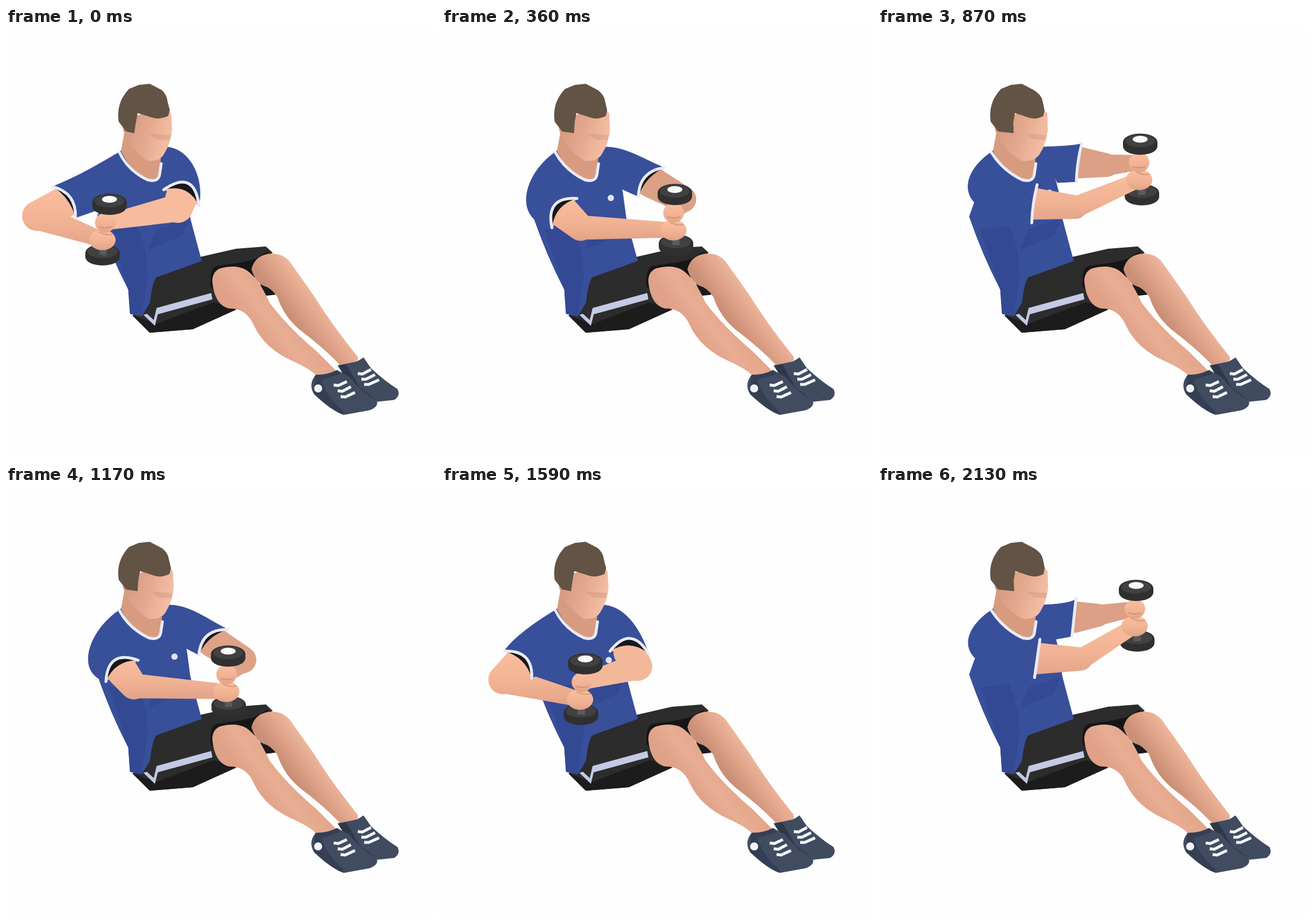
An HTML page for the animation above (2.16 s loop, 748 px wide and 748 px high).

```html
<!DOCTYPE html>
<html lang="en">
<head>
<meta charset="utf-8">
<title>Seated twist with dumbbell</title>
<style>
  html, body { margin: 0; width: 100%; height: 100%; overflow: hidden; background: #fefefe; }
  svg { display: block; width: 100vw; height: 100vh; }
  .shirt { fill: #384f9a; stroke: #384f9a; stroke-width: 1; stroke-linejoin: round; }
  .shade { fill: #263a7c; opacity: .25; }
  .band { fill: #17181c; }
  .trim { fill: none; stroke: #e8ebf6; stroke-width: 5; stroke-linecap: round; stroke-linejoin: round; }
  .skin { fill: url(#skinTone); }
  .lace { fill: none; stroke: #f4f5f8; stroke-width: 5; }
  .crease { fill: none; stroke: #a8694f; stroke-width: 2; opacity: .4; }
</style>
</head>
<body>
<svg viewBox="0 0 748 748">
  <defs>
    <linearGradient id="skinTone" x2="0" y2="1">
      <stop stop-color="#f9bf9f"/><stop offset=".6" stop-color="#f1b294"/><stop offset="1" stop-color="#e2a286"/>
    </linearGradient>
    <linearGradient id="farLegTone" gradientUnits="userSpaceOnUse" x1="502" y1="512" x2="550" y2="476">
      <stop stop-color="#c98f77"/><stop offset=".5" stop-color="#dfa388"/><stop offset="1" stop-color="#efb89d"/>
    </linearGradient>
    <linearGradient id="nearLegTone" gradientUnits="userSpaceOnUse" x1="425" y1="520" x2="480" y2="478">
      <stop stop-color="#dfa188"/><stop offset=".5" stop-color="#e8ad92"/><stop offset="1" stop-color="#e3a68b"/>
    </linearGradient>
    <linearGradient id="faceTone" x2="1" y2=".3">
      <stop stop-color="#cf9479"/><stop offset=".55" stop-color="#e2a78c"/><stop offset="1" stop-color="#f3bda3"/>
    </linearGradient>
    <g id="plate">
      <path fill="#303031" d="M-30-3C-30-24 30-24 30-3V3C29 23-29 23-30 3Z"/>
      <ellipse cy="-6" rx="26" ry="11" fill="#414141"/>
    </g>
  </defs>

  <g id="lower">
    <path fill="#1b1b1c" d="M440 440L472 457 468 464 450 466Z"/>
    <path fill="#2c2c2d" d="M250 440L262 425 330 400 400 384 452 380 464 391 430 412 424 432 412 470 400 490 325 524 250 530 220 500 240 480Z"/>
    <path fill="#1c1c1d" d="M220 500L262 515 300 500 362 477 400 490 325 524 250 530Z"/>
    <path fill="#161617" d="M356 450Q353 420 366 414L408 408 432 402 458 388 450 398 430 440 380 470Z"/>
    <path fill="#c3cae4" d="M262 487L357 461 359 472 264 498 259 518 239 499 245 497 257 508Z"/>
    <path fill="url(#farLegTone)" d="M427 420Q432 397 456 393Q480 390 494 407L535 465Q566 515 612 572L613 590 585 595 579 584Q552 556 511 525Q484 503 472 468Q462 452 447 448Q434 442 427 420Z"/>
    <path fill="url(#nearLegTone)" d="M359 442Q358 424 373 418Q400 411 418 421Q440 436 458 477Q488 518 541 563L574 596 572 612 545 615 537 602Q526 592 500 580Q450 558 431 517Q418 487 388 488Q363 482 359 442Z"/>
    <path fill="#404b60" d="M577 587L611 580 622 573 635 592Q660 615 681 628Q687 640 675 647L647 650 615 632Z"/>
    <path fill="#2e384b" d="M577 587L592 585 615 625 647 650 625 645 590 608Z"/>
    <path fill="#414c61" d="M539 603Q557 604 576 595L598 607Q617 633 645 648Q649 659 632 665L588 673Q568 667 536 637Q525 620 539 603Z"/>
    <path fill="#353f53" d="M538 604Q557 605 576 595L582 602 549 612Q556 640 586 666L588 673Q568 667 536 637Z"/>
    <circle cx="543" cy="627" r="7" fill="#f4f5f8"/>
    <path class="lace" d="M570 621l8 1 15-7M577 631l8 1 15-8M582 641l8 1 17-8M612 601l8 1 15-8M618 611l8 0 16-8M623 620l8 0 18-8"/>
  </g>

  <g id="torso">
    <path class="shirt" d="M200 213L159 328Q182 395 213 455L216 497 236 501 250 478Q254 440 262 433L340 405Q325 350 320 330L314 285 295 212 275 208Z"/>
    <path class="shade" d="M178 350L228 345Q248 390 246 436L236 500 216 497 213 455Z"/>
    <path class="shade" d="M248 385L262 350 318 332 305 362 268 378Z"/>
    <circle id="badge" r="5.5" fill="#dfe4f2"/>
  </g>

  <path id="farArm"/>
  <path id="farSleeve" class="shirt"/><path id="farBand" class="band"/><path id="farCuff" class="trim"/>
  <use id="bottomPlate" href="#plate"/>
  <path id="handle" stroke="#5a5a5b" stroke-width="13"/>
  <path id="nearArm" class="skin"/>
  <g id="nearHand"><ellipse class="skin" rx="23" ry="18"/><path class="crease" d="M-6-14Q6-7 18-10"/></g>
  <path id="nearSleeve" class="shirt"/><path id="nearBand" class="band"/><path id="nearCuff" class="trim"/>
  <g id="farHand"><ellipse class="skin" rx="18" ry="17"/><path class="crease" d="M-11 7Q0 11 11 7"/></g>
  <g id="topPlate"><use href="#plate"/><ellipse cy="-9" rx="13" ry="6" fill="#fafafa"/></g>

  <path id="neck" fill="#d79c80"/><path id="collar" class="trim"/>
  <path id="face" fill="url(#faceTone)"/><path id="brow" fill="#c98d74" opacity=".35"/>
  <path id="hair" fill="#625345"/>
</svg>
<script>
const LOOP = 2160, STEP = 30, HALF = 720, LEFT_TURN = 30;
const MIDDLE = .47;   // swing value at which the middle key point is reached
const CUFF = 67;      // sleeve opening, end to end
const CHEST = [235, 290], FAR_CHEST = [290, 270];

const $ = id => document.getElementById(id);
const set = (id, d) => $(id).setAttribute('d', d);
const place = (id, [x, y]) => $(id).setAttribute('transform', `translate(${x} ${y})`);
const mix = (a, b, k) => a.map((v, i) => v + (b[i] - v) * k);
const clamp = v => Math.max(0, Math.min(1, v));
const smooth = v => v * v * (3 - 2 * v);

// Parabola through a left, middle and right key value.
const sweep = (left, middle, right) => w => {
  const bow = (middle - left - (right - left) * MIDDLE) / (MIDDLE * (1 - MIDDLE));
  return left + (right - left) * w + bow * w * (1 - w);
};
const track = (left, middle, right) => {
  const x = sweep(left[0], middle[0], right[0]), y = sweep(left[1], middle[1], right[1]);
  return w => [x(w), y(w)];
};

const weight = track([180, 307], [405, 290], [449, 182]);
const tilt = sweep(-12, 2, 2);
const near = {
  cuff: track([101, 303], [213, 322], [277, 300]),
  elbow: track([54, 327], [241, 347], [353, 301]),
  angle: w => 54 - 136 * smooth(clamp(1.45 * w)),
  bulge: sweep(27, 44, -8),
  outline: p => [[145, 247], [118, p[1] - 15]],
};
const far = {
  cuff: track([305, 295], [364, 268], [341, 228]),
  elbow: track([299, 313], [419, 298], [382, 225]),
  angle: sweep(24, -48, -84),
  bulge: sweep(55, 28, 0),
  outline: (p, q) => [[318, 206], [345, (208 + q[1]) / 2]],
};

// Tapered limb: the hull of two circles.
function capsule([x1, y1], r1, [x2, y2], r2) {
  const gap = Math.hypot(x2 - x1, y2 - y1);
  const dir = Math.atan2(y2 - y1, x2 - x1);
  const open = Math.acos(Math.max(-1, Math.min(1, (r1 - r2) / gap)));
  const pt = (x, y, r, t) => `${x + r * Math.cos(t)} ${y + r * Math.sin(t)}`;
  const wide = r1 < r2 ? 1 : 0;
  return `M${pt(x1, y1, r1, dir + open)}L${pt(x2, y2, r2, dir + open)}`
    + `A${r2} ${r2} 0 ${wide} 0 ${pt(x2, y2, r2, dir - open)}L${pt(x1, y1, r1, dir - open)}`
    + `A${r1} ${r1} 0 ${1 - wide} 0 ${pt(x1, y1, r1, dir + open)}Z`;
}

function drawArm(side, arm, w, hand, neck) {
  const mid = arm.cuff(w), elbow = arm.elbow(w), radius = 26 - 6 * w;
  const turn = arm.angle(w) * Math.PI / 180, bulge = Math.max(0, arm.bulge(w));
  const at = (along, out) => [
    mid[0] + along * Math.cos(turn) + out * Math.sin(turn),
    mid[1] + along * Math.sin(turn) - out * Math.cos(turn)];
  const p = at(-CUFF / 2, 0), q = at(CUFF / 2, 0), c = at(0, bulge), fold = at(0, bulge * .5);
  const [outer, inner, chest] = side === 'near' ? [p, q, CHEST] : [q, p, FAR_CHEST];
  const [h1, h2] = arm.outline(p, q);

  set(side + 'Arm', `M${q}Q${c} ${p}Z` + capsule(mid, CUFF * .41, elbow, radius)
    + capsule(elbow, radius - 2, hand, 13));
  set(side + 'Sleeve', `M${neck}C${h1} ${h2} ${outer}Q${c} ${inner}L${mix(inner, chest, .6)}Z`);
  set(side + 'Band', `M${p}Q${c} ${q}Q${fold} ${p}Z`);
  set(side + 'Cuff', `M${p}Q${c} ${q}`);
}

// d is how far the face has turned to the right.
function drawHead(d) {
  set('neck', `M208 170L200 214Q218 252 248 264L${267 + d / 2} 262 ${270 + d / 2} 215Z`);
  set('collar', `M197 216Q${212 + d / 2} 248 ${246 + d / 2} 264Q${264 + d / 2} 269 ${267 + d / 2} 256L${270 + d / 2} 236`);
  set('face', `M202 160L${275 + d} 138 ${287 + d * .8} 148 ${289 + d * .7} 176`
    + `Q${287 + d * .7} 200 ${275 + d * .7} 219Q${268 + d * .5} 233 ${246 + d * .5} 231Q214 210 204 178Z`);
  set('brow', `M${248 + d} 184L${287 + d * .7} 186 ${284 + d * .7} 195 ${262 + d} 194Z`);
  set('hair', `M196 163Q191 130 214 106L231 99 250 97 271 108Q${280 + d * .5} 116 ${281 + d * .6} 128`
    + `L${285 + d * .5} 143 ${282 + d * .6} 153Q${266 + d} 160 ${255 + d * .8} 156L${229 + d} 148`
    + ` ${226 + d} 164 ${223 + d * 1.4} 183 209 180Z`);
}

// 0 at the far left of the twist, 1 at the far right.
function swing(time) {
  const turn = (time - LEFT_TURN + 2 * HALF) % (2 * HALF);
  const u = HALF - Math.abs(HALF - turn);
  const x = clamp((u - 30) / (HALF - 90));
  return x - .04 * Math.sin(2 * Math.PI * x);
}

function draw(time) {
  const w = swing(time), turn = 10 * w;
  const top = weight(w), bottom = [top[0] + tilt(w), top[1] + 88];
  const farHand = mix(top, bottom, .36), nearHand = mix(top, bottom, .7);
  nearHand[0] -= 4;
  farHand[0] -= 3;

  drawArm('far', far, w, farHand, [274 + turn * 1.2, 207]);
  drawArm('near', near, w, nearHand, [202, 213]);
  const tone = mix([247, 187, 157], [219, 160, 134], smooth(clamp(2 * w)));
  $('farArm').setAttribute('fill', `rgb(${tone.map(Math.round)})`);
  set('handle', `M${top}L${bottom}`);
  place('topPlate', top);
  place('bottomPlate', bottom);
  place('nearHand', nearHand);
  place('farHand', farHand);
  place('badge', [289 + turn, 305 - turn * 2]);
  drawHead(turn);
}

const start = performance.now();
function tick() {
  const time = (performance.now() - start) % LOOP;
  draw(Math.floor(time / STEP) * STEP);
  requestAnimationFrame(tick);
}
tick();
</script>
</body>
</html>
```
